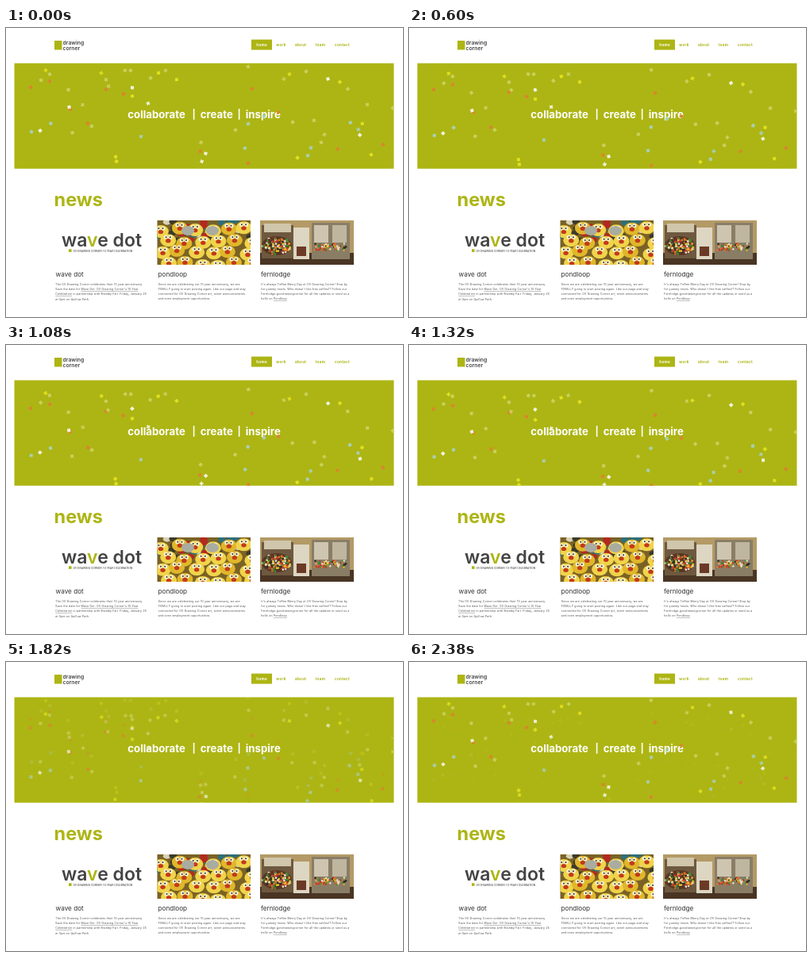
An HTML page with a canvas for the animation above (2.46 s loop, 500 px wide and 365 px high).

```html
<!DOCTYPE html>
<html lang="en">
<head>
<meta charset="utf-8">
<style>
  html, body { margin: 0; width: 100%; height: 100%; overflow: hidden; background: #fff; }
  svg, canvas { position: absolute; left: 0; top: 0; width: 500px; height: 365px; }
  text { font-family: Inter, sans-serif; fill: #444; white-space: pre; }
  .green { fill: #adb514; }
  .nav { font-size: 4.6px; font-weight: 700; letter-spacing: .25px; }
  .logo { font-size: 6.8px; font-weight: 600; }
  .banner { font-size: 13.2px; font-weight: 700; fill: #fff; }
  .bar { font-size: 11.5px; }
  .title { font-size: 8.2px; fill: #333; }
  .body { font-size: 3.4px; letter-spacing: .22px; fill: #4a4a4a; }
  .link { text-decoration: underline; text-decoration-thickness: .3px; text-underline-offset: .7px; }
</style>
</head>
<body>
<svg viewBox="0 0 500 365">
  <rect class="green" x="61" y="16" width="9.5" height="11.5"/>
  <g class="logo">
    <text x="71.5" y="21">drawing</text>
    <text x="71.5" y="27.5">corner</text>
  </g>

  <rect class="green" x="309" y="14.6" width="26" height="13"/>
  <g class="nav">
    <text x="315.3" y="23.3" style="fill:#fff">home</text>
    <text class="green" x="340.3" y="23.3">work</text>
    <text class="green" x="364" y="23.3">about</text>
    <text class="green" x="389.8" y="23.3">team</text>
    <text class="green" x="414" y="23.3">contact</text>
  </g>

  <rect class="green" x="10.5" y="44.5" width="478" height="133.2"/>
  <g>
    <text class="banner" x="153.3" y="114">collaborate</text>
    <text class="banner bar" x="236.7" y="113" text-anchor="middle">|</text>
    <text class="banner" x="244.8" y="114">create</text>
    <text class="banner bar" x="293.7" y="113" text-anchor="middle">|</text>
    <text class="banner" x="301.8" y="114">inspire</text>
  </g>

  <text class="green" x="60.5" y="225" font-size="23.5" font-weight="700">news</text>

  <text x="70" y="276" font-size="23" font-weight="600">wa<tspan class="green">v</tspan>e dot</text>
  <rect class="green" x="79" y="279.3" width="3.6" height="3.6"/>
  <text x="84.5" y="282.5" font-size="3.6" style="font-family:Roboto,sans-serif">OV DRAWING CORNER 10 YEAR CELEBRATION</text>

  <g>
    <text class="title" x="62.5" y="314">wave dot</text>
    <text class="title" x="191.5" y="314">pondloop</text>
    <text class="title" x="321" y="314">fernlodge</text>
  </g>

  <text class="body" y="325">
    <tspan x="62.3">The OV Drawing Corner celebrates their 10 year anniversary.</tspan>
    <tspan x="62.3" dy="6.2">Save the date for <tspan class="link">Wave Dot: OV Drawing Corner's 10 Year</tspan></tspan>
    <tspan class="link" x="62.3" dy="6.2">Celebration</tspan><tspan> in partnership with Bramby Fair. Friday, January 25</tspan>
    <tspan x="62.3" dy="6.2">at 5pm on Quillow Path.</tspan>
  </text>
  <text class="body" y="324.6">
    <tspan x="191.8">Since we are celebrating our 10 year anniversary, we are</tspan>
    <tspan x="191.8" dy="6.2">FINALLY going to start posting again. Like our page and stay</tspan>
    <tspan x="191.8" dy="6.2">connected for OV Drawing Corner art, event announcements</tspan>
    <tspan x="191.8" dy="6.2">and even employment opportunities.</tspan>
  </text>
  <text class="body" y="324.6">
    <tspan x="321.3">It's always Toffee Merry Day at OV Drawing Corner! Stop by</tspan>
    <tspan x="321.3" dy="6.2">for yummy treats. Who doesn't like free selfies!? Follow our</tspan>
    <tspan x="321.3" dy="6.2">Fernlodge @ovdrawingcorner for all the updates or send us a</tspan>
    <tspan x="321.3" dy="6.2">hello on <tspan class="link">Pondloop</tspan>.</tspan>
  </text>
</svg>
<canvas id="stage" width="500" height="365"></canvas>
<script>
const ctx = document.getElementById('stage').getContext('2d');
const noise = n => { const v = Math.sin(n * 12.9898 + 4.1) * 43758.5453; return v - Math.floor(v); };

function box(color, x, y, w, h) {
  ctx.fillStyle = color;
  ctx.fillRect(x, y, w, h);
}
function oval(color, x, y, rx, ry = rx) {
  ctx.fillStyle = color;
  ctx.beginPath();
  ctx.ellipse(x, y, rx, ry, 0, 0, 7);
  ctx.fill();
}
function framed(x, y, w, h, paint) {
  ctx.save();
  ctx.beginPath();
  ctx.rect(x, y, w, h);
  ctx.clip();
  paint();
  ctx.restore();
}

// Soft toys: overlapping yellow heads with red beaks
function paintToys() {
  box('#7a6226', 190, 243, 118, 56);
  const cloth = ['#2f6f78', '#b3291f', '#d9d2b4', '#3b3a2a'];
  for (let i = 0; i < 50; i++)
    oval(cloth[i % 4], 190 + noise(i) * 118, 243 + noise(i + 90) * 25, 5, 3.5);
  for (let row = 0; row < 4; row++)
    for (let col = 0; col < 6; col++) {
      const n = row * 6 + col + 200;
      const x = 194 + col * 21 + (row % 2) * 9 + noise(n) * 6;
      const y = 252 + row * 14.5 + noise(n + 50) * 6;
      oval(n % 3 ? '#f0d44a' : '#e0b72a', x, y, 10, 8);
      oval('#f6f1d8', x - 3, y - 4, 2.6);
      oval('#f6f1d8', x + 3, y - 4, 2.6);
      oval('#3a3020', x - 2.6, y - 4, 1);
      oval('#3a3020', x + 2.6, y - 4, 1);
      oval('#c23a1c', x, y + .5, 3.2, 2.6);
    }
  oval('#a9aca0', 229, 256, 8, 6);
  oval('#a9aca0', 260, 256, 8, 6);
}

// Sweet dispensers in front of a tan wall
function paintMachines() {
  box('#b39a66', 320, 243, 118, 56);
  box('#4a3524', 320, 284, 118, 15);
  box('#6e5940', 322, 249, 40, 42);
  box('#cfc6ac', 325, 247, 34, 11);
  box('#ddd6c2', 362, 252, 20, 40);
  box('#6b3a26', 366, 276, 12, 12);
  box('#8a7d66', 385, 246, 48, 46);
  box('#cdc5b0', 388, 249, 18, 22);
  box('#bfb69f', 411, 249, 18, 22);
  oval('#5a3524', 341, 275, 19, 12);
  const sweets = ['#c8342b', '#e3c02c', '#3f8f3c', '#e8dfcb', '#d9772a', '#2d2a24'];
  for (let i = 0; i < 130; i++) {
    const turn = noise(i + 400) * 7, reach = Math.sqrt(noise(i + 600));
    oval(sweets[i % 6], 341 + Math.cos(turn) * reach * 18, 275 + Math.sin(turn) * reach * 11, 1.4);
  }
  for (let i = 0; i < 70; i++)
    oval(sweets[(i * 5) % 6], 388 + noise(i + 800) * 42, 272 + noise(i + 900) * 9, 1.3);
}

// Positions of the confetti at SAMPLE seconds
const SAMPLE = .24;
const confetti = {
  '#d9862f': [[31,76],[55,69],[103,122.5],[126,79],[148,84.5],[244.5,157.5],[305,172],[310,79],
    [343,108.5],[417.5,154],[475,149],[81,104]],
  '#a9cfb4': [[56.3,122.7],[170,138.8],[305,122.7],[301,153],[380,163],[443.7,130],[325,112.7],
    [433.6,121],[32,133],[384,153]],
  '#dfe01f': [[138,164],[367,166],[460,162],[357,60.4],[420.5,69.4],[448.7,122.7],[215,66.4],[50,55],
    [159,87.5],[192,58.5],[139,170],[120,58.5]],
  '#f1f3dd': [[79.5,101.6],[43,131],[159,76.5],[179,97],[251.5,160],[405.5,66.4],[445.7,137],[246.5,170]],
  '#c9d15c': [[44,67.5],[55,59.5],[78.5,79.5],[96.5,98.5],[83.5,134],[108,126],[126,66.5],[129,75.5],
    [150,55.5],[157,55.5],[182,64.5],[201,55.5],[245.5,146],[289,131],[305,50.5],[350,65.5],
    [378,56.5],[361,120],[388,118],[401,136],[397,146],[430.5,78.5],[455,98.5],[487,102.5]]
};
const pieces = Object.entries(confetti).flatMap(([color, spots]) => spots.map(([x, y]) => ({ color, x, y })));

function drawConfetti(seconds, alpha) {
  const elapsed = seconds - SAMPLE;
  ctx.globalAlpha = alpha;
  pieces.forEach(({ color, x, y }, i) => {
    const seed = noise(i + 1);
    ctx.save();
    ctx.translate(x + elapsed * (seed - .6), y + elapsed * (4.5 + 4.5 * noise(i + 70)));
    ctx.rotate(seed * 6 + elapsed * (noise(i + 140) - .5) * 3);
    if (i % 4 == 1) {
      box(color, -2.5, -.9, 5, 1.8);
      box(color, -.9, -2.5, 1.8, 5);
    } else box(color, -2, -2, 4, 4);
    ctx.restore();
  });
}

const LOOP = 2460, FADE_START = 1560, SLOW_START = 1740;

function draw(now) {
  const t = now % LOOP;
  const time = t < SLOW_START ? t - t % 60 : t - (t - SLOW_START) % 80;
  const mix = Math.max(0, (time - FADE_START) / (LOOP - FADE_START));
  ctx.clearRect(10, 44, 479, 134);
  framed(10.5, 45, 478, 132.7, () => {
    drawConfetti(time / 1000, 1 - mix);
    if (mix) drawConfetti((time - LOOP) / 1000, mix);
  });
  requestAnimationFrame(() => draw(performance.now() - start));
}

framed(190.5, 243, 117.5, 56, paintToys);
framed(320, 243, 118, 56, paintMachines);
const start = performance.now();
draw(0);
</script>
</body>
</html>
```
